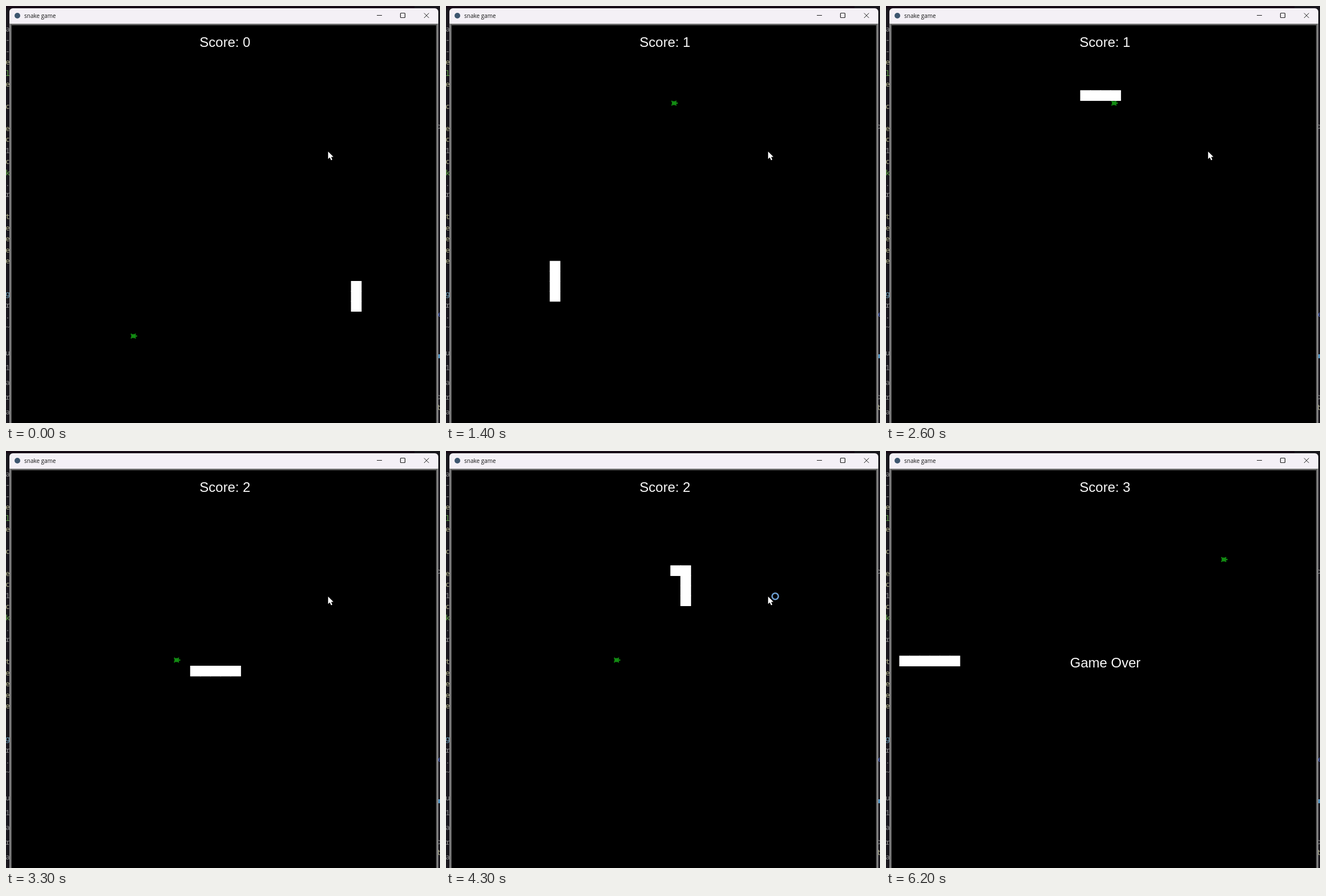
An HTML page with a canvas that plays this animation: 763x734 px, repeating every 6300 ms.

```html
<!DOCTYPE html>
<html lang="en">
<head>
<meta charset="utf-8">
<title>snake game</title>
<style>
  html, body { margin: 0; width: 100%; height: 100%; overflow: hidden; background: #000; }
  canvas { display: block; }
</style>
</head>
<body>
<canvas id="stage" width="763" height="734"></canvas>
<script>
const ctx = document.getElementById('stage').getContext('2d');
const LOOP = 6300, TICK = 100;
const STEP_MS = 40.865, DELAY = 9.5;
const CELL = 17.67, SIZE = 18.7, REACH = 13.25;
const LEFT = 182.4, TOP = 484;
const MONO = '13px "Noto Sans Mono", monospace';
const SANS = '24px "Liberation Sans", Arial, sans-serif';

// The snake's route: its starting tail cell, then runs of cells, rows counted upwards.
const headings = { U: [0, 1], D: [0, -1], L: [-1, 0], R: [1, 0] };
const route = [[24, 0]];
for (const run of 'D5 L24 U24 R12 D13 L7 U10 R8 D9 L22'.split(' ')) {
  const [dx, dy] = headings[run[0]];
  for (let n = +run.slice(1); n > 0; n--) {
    const [x, y] = route[route.length - 1];
    route.push([x + dx, y + dy]);
  }
}
const START = 2, LAST = route.length - 1 - START;
const corner = ([c, r]) => [LEFT + c * CELL, TOP - r * CELL];

// A food is eaten when the centre of the head comes within reach.
const foods = [[224, 581], [401, 171], [300, 368], [594, 191]];
const eaten = [];
for (let step = 0; step <= LAST; step++) {
  const [x, y] = corner(route[step + START]);
  const [fx, fy] = foods[eaten.length];
  if (Math.hypot(x + SIZE / 2 - fx, y + SIZE / 2 - fy) < REACH) eaten.push(step);
}

function rect(color, x, y, w, h) {
  ctx.fillStyle = color;
  ctx.fillRect(x, y, w, h);
}

function text(str, x, y, font, color, align = 'left') {
  ctx.font = font;
  ctx.fillStyle = color;
  ctx.textAlign = align;
  ctx.fillText(str, x, y);
}

function line(color, width, ...points) {
  ctx.beginPath();
  for (const [x, y] of points) ctx.lineTo(x, y);
  ctx.strokeStyle = color;
  ctx.lineWidth = width;
  ctx.stroke();
}

function ellipse(color, x, y, rx, ry = rx) {
  ctx.beginPath();
  ctx.ellipse(x, y, rx, ry, 0, 0, Math.PI * 2);
  ctx.fillStyle = color;
  ctx.fill();
}

function codeColor(ch) {
  if ('kl'.includes(ch)) return '#69ad4d';
  if ('g_'.includes(ch)) return '#73a8c5';
  return 'ect'.includes(ch) ? '#b0b088' : '#8f8f8f';
}

function codeColumn(str, x, y, pitch) {
  [...str].forEach((ch, i) => text(ch, x, y + i * pitch, MONO, codeColor(ch)));
}

function drawEditor() {
  rect('#1a181e', 0, 0, 763, 734);
  rect('#180c17', 0, 0, 718, 4);
  codeColumn('a--ele c ec1ck.r teeee  gr.~', -1, 45, 19.43);
  codeColumn('u1ara', -1, 615, 26);
  text('b', 757, 216, MONO, '#8f8f8f');
  text('e', 759, 547, MONO, '#4a62c0');
  codeColumn('pt', 757, 692, 19.4);
  rect('#4f8fbd', 759, 613, 4, 7);
}

function drawWindow() {
  rect('#8b8b8b', 6, 28, 754, 706);
  rect('#5c5c5c', 8, 32, 750, 702);
  rect('#000', 10, 34, 746, 700);
  ctx.beginPath();
  ctx.roundRect(6, 4, 754, 27, [6, 6, 0, 0]);
  ctx.fillStyle = '#f4f0f6';
  ctx.fill();

  ellipse('#3d566f', 20, 17, 5);
  text('snake game', 32, 20.5, '10px "Open Sans", sans-serif', '#161616');

  const ink = '#202020';
  line(ink, 1, [652, 16.5], [661, 16.5]);
  line(ink, 1, [735, 12.5], [743.5, 21]);
  line(ink, 1, [743.5, 12.5], [735, 21]);
  ctx.lineWidth = 1.2;
  ctx.beginPath();
  ctx.roundRect(693.5, 12.5, 8, 8, 1);
  ctx.stroke();
}

function drawTurtle(x, y) {
  const green = '#138c13';
  ellipse(green, x, y, 4, 3.4);
  for (const s of [-1, 1]) line(green, 2, [x - 4.5, y - 4 * s], [x + 4, y + 4 * s]);
  line(green, 2.4, [x, y], [x + 6.5, y]);
}

function drawSnake(step, length) {
  const head = step + START;
  for (const cell of route.slice(head - length + 1, head + 1)) {
    rect('#fff', ...corner(cell), SIZE, SIZE);
  }
}

function drawPointer(busy) {
  const tip = [[0, 0], [0, 13], [3, 10.3], [5.2, 15.2], [7.4, 14.2], [5.3, 9.5], [9.3, 9.2]];
  ctx.beginPath();
  for (const [x, y] of tip) ctx.lineTo(566.3 + x, 256.3 + y);
  ctx.fillStyle = '#fff';
  ctx.fill();
  if (!busy) return;
  ctx.beginPath();
  ctx.arc(578.8, 255.8, 5.5, 0, Math.PI * 2);
  ctx.strokeStyle = '#6d9fd2';
  ctx.lineWidth = 2.6;
  ctx.stroke();
}

function draw(t) {
  const step = Math.min(LAST, Math.max(0, Math.floor((t - DELAY) / STEP_MS)));
  const score = eaten.filter(s => step >= s).length;
  const growth = eaten.filter(s => step > s).length;
  drawEditor();
  drawWindow();
  text('Score: ' + score, 385, 72, SANS, '#f8f8f8', 'center');
  drawTurtle(...foods[score]);
  drawSnake(step, 3 + growth);
  if (step === LAST) text('Game Over', 385.5, 381, SANS, '#f8f8f8', 'center');
  if (t < 6000) drawPointer(t >= 4100 && t < 4500);
}

const began = performance.now();
function frame() {
  const t = (performance.now() - began) % LOOP;
  draw(Math.floor(t / TICK) * TICK);
  requestAnimationFrame(frame);
}
frame();
</script>
</body>
</html>
```
